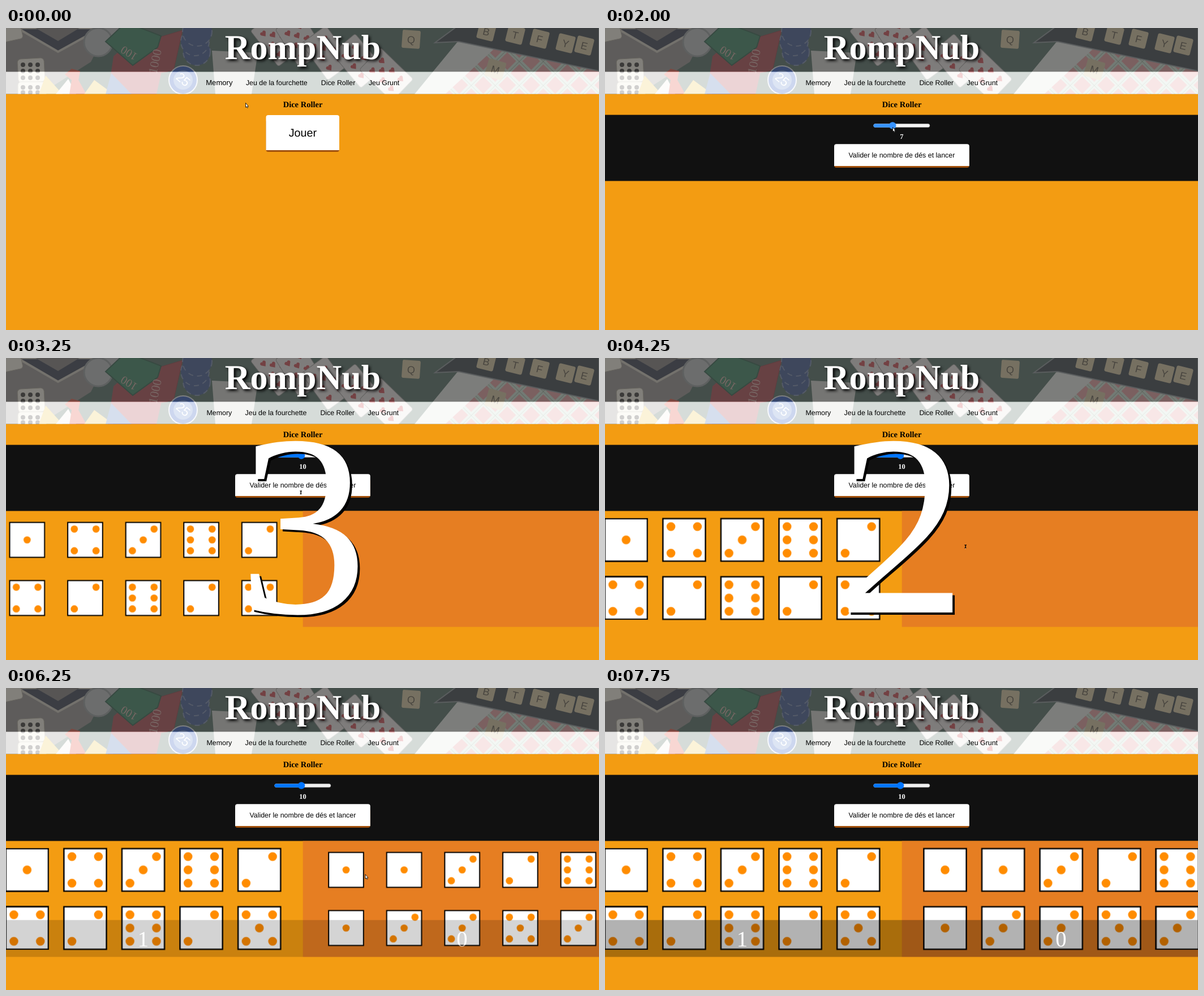
An HTML page that plays this animation: 1048x534 px, repeating every 8.25 s.

```html
<!DOCTYPE html>
<html lang="fr">
<head>
<meta charset="utf-8">
<title>Dice Roller</title>
<style>
  html, body { margin: 0; width: 100%; height: 100%; overflow: hidden; background: #f39c12; }
  svg { display: block; width: 1048px; height: 534px; text-rendering: geometricPrecision; }
  text { font-family: "Liberation Sans", Arial, sans-serif; font-size: 12.4px; }
  .serif, .serif text { font-family: "Liberation Serif", "Times New Roman", serif; }
  .mid, .mid text { text-anchor: middle; }
  #logo { font-size: 62px; font-weight: bold; fill: #fff; text-shadow: 3px 3px 5px #000; }
  #heading { font-size: 14.5px; font-weight: bold; }
  #values text { font-weight: bold; fill: #fff; }
  #play text { font-size: 19.8px; }
  #count text { font-size: 458px; fill: #fff; text-shadow: 3.9px 3.9px 0 #000; }
  .score text { font-size: 38.7px; fill: #fff; }
  .tile rect { fill: #d2c093; }
  .tile text { font-size: 18px; fill: #4a4030; text-anchor: middle; }
  .die rect { fill: #fff; stroke: #000; stroke-width: 2.4; }
  .die circle { fill: #ff8c00; }
</style>
</head>
<body>
<svg viewBox="0 0 1048 534">
  <defs>
    <clipPath id="banner"><rect width="1048" height="116.5"/></clipPath>
    <path id="heart" d="M0 6L-5 0A2.6 2.6 0 0 1 0-3A2.6 2.6 0 0 1 5 0Z" fill="#c9363b"/>
    <pattern id="cells" width="30" height="30" patternUnits="userSpaceOnUse" patternTransform="translate(801 101) rotate(45) translate(-15 -15)">
      <rect width="30" height="30" fill="#c9dccb"/>
      <rect x="4" y="4" width="22" height="22" fill="#e08f90"/>
      <path d="M0 0H30M0 0V30" stroke="#5d7a66"/>
    </pattern>
    <g id="card">
      <rect x="-27" y="-40" width="54" height="80" rx="4" fill="#e9e4e0" stroke="#8f8a88"/>
      <use href="#heart" x="-12" y="-22"/><use href="#heart" x="12" y="-22"/>
      <use href="#heart" y="-10"/><use href="#heart" x="-12" y="3"/><use href="#heart" x="12" y="3"/>
      <use href="#heart" x="-12" y="24"/><use href="#heart" x="12" y="24"/>
    </g>
  </defs>

  <!-- table top with game pieces -->
  <g id="table" clip-path="url(#banner)">
    <rect width="1048" height="117" fill="#3d5c4e"/>
    <path d="M0 0H180L150 60 60 117H0Z" fill="#8a8480"/>
    <path d="M20 0L92 42 168 0Z" fill="#22283a" stroke="#c9c2b4" stroke-width="4"/>
    <path d="M52 0L92 23 130 0Z" fill="#75706c"/>
    <g fill="#f1ecdc" stroke="#a9a28f">
      <rect x="-12" y="-14" width="38" height="38" rx="5" transform="rotate(-12)"/>
      <rect x="21" y="54" width="47" height="42" rx="6" transform="rotate(-3 44 75)"/>
      <rect x="21" y="95" width="50" height="40" rx="6"/>
    </g>
    <path d="M30 65H62M30 76H62M30 88H62M30 105H62M30 114H62" stroke="#24211e" stroke-width="8" stroke-linecap="round" stroke-dasharray="0 13"/>
    <path d="M58 117L70 84 100 117Z" fill="#efc64a"/>
    <path d="M88 117L110 90 124 117Z" fill="#f7f4ee"/>
    <path d="M112 117L116 92 104 82 116 72 131 76 128 92 142 117Z" fill="#e0442e"/>
    <path d="M138 117L156 92 190 117Z" fill="#efc64a"/>
    <g fill="#b4b7b6" stroke="#8a9190" stroke-width="3">
      <circle cx="192" cy="4" r="23"/><circle cx="163" cy="25" r="25"/>
    </g>
    <path d="M190 50L212 30 282 45 266 117H180Z" fill="#a5363c"/>
    <path d="M252 22L312 4 296 75 270 80Z" fill="#a5363c" stroke="#8a252c"/>
    <path d="M176 24L212-10 274 14 268 34 224 66Z" fill="#25764f" stroke="#174d35" stroke-width="2"/>
    <g fill="#d4a29a" class="serif">
      <text transform="translate(208 31) rotate(-148)" style="font-size:20px" text-anchor="end">100</text>
      <text transform="translate(266 82) rotate(-78)" style="font-size:22px">1000</text>
    </g>
    <path d="M176 117L186 80 222 117Z" fill="#3f67b1"/>
    <g fill="#2b4684" stroke="#6c7ea6" stroke-width="2" stroke-dasharray="9 7">
      <circle cx="337" cy="42" r="24"/><circle cx="334" cy="24" r="25"/><circle cx="338" cy="6" r="26"/>
    </g>
    <circle cx="313" cy="92" r="25" fill="#1444b4" stroke="#dfe5f0" stroke-width="2"/>
    <circle cx="313" cy="92" r="17" fill="#5f83cc"/>
    <text transform="translate(299 89) rotate(40)" style="font-size:22px" fill="#fff">25</text>
    <path d="M364 40L445 44 434 117H370Z" fill="#cfcfc9"/>
    <use href="#card" transform="translate(478 20) rotate(-38)"/>
    <use href="#card" transform="translate(520 22) rotate(-32)"/>
    <use href="#card" transform="translate(567 44) rotate(-36)"/>
    <use href="#card" transform="translate(622 58) rotate(-40)"/>
    <use href="#card" transform="translate(672 82) rotate(-46)"/>
    <path d="M722 117L800 22 850 32 1048 84V117Z" fill="#e4e6e0"/>
    <path d="M776 117L868 32 1048 74V117Z" fill="url(#cells)"/>
    <path d="M758 26L800-5H1048V76L800 24Z" fill="#242d33" stroke="#7e878a" stroke-width="2"/>
    <g class="tile" id="tiles"></g>
  </g>
  <rect width="1048" height="77.5" fill="#484848" opacity=".66"/>
  <rect y="77.5" width="1048" height="39" fill="#fff" opacity=".79"/>

  <text id="logo" class="serif mid" x="524.5" y="55">RompNub</text>
  <text id="memory" x="354.5" y="100.5">Memory</text>
  <g id="links">
    <text x="422.6" y="100.5">Jeu de la fourchette</text>
    <text x="555.4" y="100.5">Dice Roller</text>
    <text x="639.6" y="100.5">Jeu Grunt</text>
  </g>
  <text id="heading" class="serif mid" x="524.5" y="140">Dice Roller</text>

  <g id="play" class="mid">
    <rect x="459.5" y="162" width="129.5" height="57" rx="4" fill="#a0500c"/>
    <g class="face">
      <path d="M459.5 216V158a4 4 0 0 1 4-4H585a4 4 0 0 1 4 4V216Z" fill="#fff"/>
      <text x="524.4" y="192">Jouer</text>
    </g>
  </g>

  <g id="panel">
    <rect y="153.6" width="1048" height="116.9" fill="#111"/>
    <rect id="track" x="474.7" y="169.6" width="99.2" height="6" rx="3" fill="#efefef" stroke="#b2b2b2" stroke-width=".6"/>
    <rect id="fill" class="accent" x="474.5" y="169.4" width="15" height="6.4" rx="3.2" fill="#0075ff"/>
    <circle id="thumb" class="accent" cy="172.5" r="6.2" fill="#0075ff"/>
    <g id="values" class="serif mid"></g>
    <g id="roll" class="mid">
      <rect x="405" y="214" width="238.8" height="33" rx="4" fill="#a0500c"/>
      <g class="face">
        <path d="M405 244V209.3a4 4 0 0 1 4-4H639.8a4 4 0 0 1 4 4V244Z" fill="#fff"/>
        <text x="524.4" y="228.6">Valider le nombre de dés et lancer</text>
      </g>
    </g>
  </g>

  <g id="board">
    <rect x="524.7" y="270.5" width="523.3" height="205" fill="#e67e22"/>
    <g id="left"></g>
    <g id="right"></g>
    <g class="score serif mid">
      <rect y="410.3" width="1048" height="65.2" opacity=".3"/>
      <text x="242.5" y="456.5">1</text>
      <text x="806" y="456.5">0</text>
    </g>
  </g>

  <g id="count" class="serif mid"></g>

  <g id="cursor">
    <path id="arrow" d="M.5.5V8.3L2.2 6.9 3.4 9.3 4.6 8.7 3.6 6.4H5.4Z" fill="#fff" stroke="#111" stroke-width=".9"/>
    <path id="hand" d="M-3.6-3.8L-.8-1.6 1.4-2.2 3.8-.6V3L-1.6 3.6-2.8.8-1.2.4-4-2.6Z" fill="#fff" stroke="#111"/>
    <g id="beam">
      <path d="M-1.6-2.4H2M.2-2.4V2.8M-1.4 2.8H1.4" stroke="#000" stroke-width="1.4"/>
      <rect x="-.4" y="3.4" width="1" height="1" fill="#fff"/>
    </g>
  </g>
</svg>
<script>
const LOOP = 8250;
const $ = id => document.getElementById(id);

// Holds each [ms, value] until the next one.
function play(target, prop, steps) {
  const frames = steps.map(([ms, v]) => ({ offset: ms / LOOP, [prop]: v, easing: 'step-end' }));
  frames.push({ offset: 1, [prop]: steps.at(-1)[1] });
  document.querySelectorAll(target).forEach(el =>
    el.animate(frames, { duration: LOOP, iterations: Infinity }));
}

function show(target, from, to = LOOP) {
  const steps = from ? [[0, 0], [from, 1]] : [[0, 1]];
  if (to < LOOP) steps.push([to, 0]);
  play(target, 'opacity', steps);
}

// letter tiles: letter, x, y, size, angle
$('tiles').innerHTML = [
  ['Q', 716, 20, 32, 4], ['B', 849, 6, 30, 14], ['T', 900, 12, 30, 14], ['F', 943, 19, 30, 14],
  ['Y', 989, 27, 30, 14], ['E', 1022, 31, 30, 14], ['M', 865, 73, 32, 16]
].map(([c, x, y, s, a]) => `<g transform="translate(${x} ${y}) rotate(${a})">
  <rect x="${-s / 2}" y="${-s / 2}" width="${s}" height="${s}" rx="3"/><text y="7">${c}</text></g>`).join('');

// dice
const D = 23.4;
function spots(n) {
  const p = [];
  if (n % 2) p.push([0, 0]);
  if (n > 1) p.push([D, -D], [-D, D]);
  if (n > 3) p.push([-D, -D], [D, D]);
  if (n > 5) p.push([-D, 0], [D, 0]);
  return p;
}
function deal(id, x0, faces) {
  $(id).innerHTML = [...faces].map((n, i) => {
    const x = x0 + i % 5 * 102.6, y = 321.6 + Math.floor(i / 5) * 102.8;
    return `<g transform="translate(${x} ${y})"><g class="die">
      <rect x="-37.6" y="-37.6" width="75.2" height="75.2"/>
      ${spots(+n).map(([a, b]) => `<circle cx="${a}" cy="${b}" r="7.75"/>`).join('')}</g></g>`;
  }).join('');
}
function pop(id, ms) {
  play(`#${id} .die`, 'transform',
    [[0, 'scale(.82)'], [ms + 250, 'scale(1.04)'], [ms + 500, 'scale(1)']]);
}
deal('left', 37.3, '1436242625');
deal('right', 601, '1132613353');
pop('left', 3250);
pop('right', 6250);
show('#board', 3250);
show('#right', 6250);
play('.score', 'opacity', [[0, 0], [6250, .57], [6500, .95], [6750, 1]]);

// countdown
$('count').innerHTML = [3, 2, 1].map(n => `<text id="n${n}" x="524.9" y="450">${n}</text>`).join('');
[3, 2, 1].forEach((n, i) => show('#n' + n, 3250 + i * 1000, 4250 + i * 1000));

// menu and buttons
play('#memory', 'fontSize', [[0, '13.1px'], [250, '12.4px']]);
play('#memory', 'transform', [[0, 'translate(-1.3px, .6px)'], [250, 'none']]);
play('#links', 'transform', [[0, 'translate(1.3px, 0px)'], [250, 'none']]);
show('#play', 0, 750);
show('#panel', 750);
const down = 'translate(0px, 1px)';
play('#play .face', 'transform', [[0, 'none'], [250, down]]);
play('#roll .face', 'transform', [[0, 'none'], [3000, down], [3250, 'none']]);

// slider from 1 to 20
const knob = v => 480.7 + (v - 1) * 4.59;
const drag = [[0, 3], [1750, 6], [2000, 7], [2250, 10]];
play('#thumb', 'transform', drag.map(([ms, v]) => [ms, `translate(${knob(v)}px, 0px)`]));
play('#fill', 'width', drag.map(([ms, v]) => [ms, knob(v) - 474.5 + 'px']));
play('.accent', 'fill', [[0, '#0075ff'], [1500, '#005cc8'], [2000, '#3793ff'], [2750, '#0075ff']]);
play('#track', 'fill', [[0, '#efefef'], [1500, '#e5e5e5'], [2000, '#f5f5f5'], [2750, '#efefef']]);
$('values').innerHTML = [3, 7, 10].map(v => `<text id="v${v}" x="524.4" y="196">${v}</text>`).join('');
show('#v3', 0, 2000);
show('#v7', 2000, 2250);
show('#v10', 2250);

// pointer: ms, shape, x, y
const path = [
  [0, 'arrow', 423, 132], [250, 'hand', 514, 200], [500, 'hand', 530, 200],
  [750, 'beam', 529, 196], [1000, 'beam', 510, 197], [1250, 'arrow', 489, 180],
  [1500, 'arrow', 490, 174], [1750, 'arrow', 505, 174], [2000, 'arrow', 508, 175],
  [2250, 'arrow', 527, 176], [2750, 'hand', 521.5, 237.5], [3250, 'beam', 521, 237.5],
  [3500, 'beam', 525, 236], [3750, 'beam', 565, 319], [4000, 'beam', 576, 330],
  [4250, 'beam', 637, 333], [6250, 'arrow', 634.5, 329], [7500, 'arrow', 613, 502],
  [7750, '', 613, 502]
];
play('#cursor', 'transform', path.map(([ms, , x, y]) => [ms, `translate(${x}px, ${y}px)`]));
for (const shape of ['arrow', 'hand', 'beam'])
  play('#' + shape, 'opacity', path.map(([ms, s]) => [ms, s === shape ? 1 : 0]));
</script>
</body>
</html>
```
